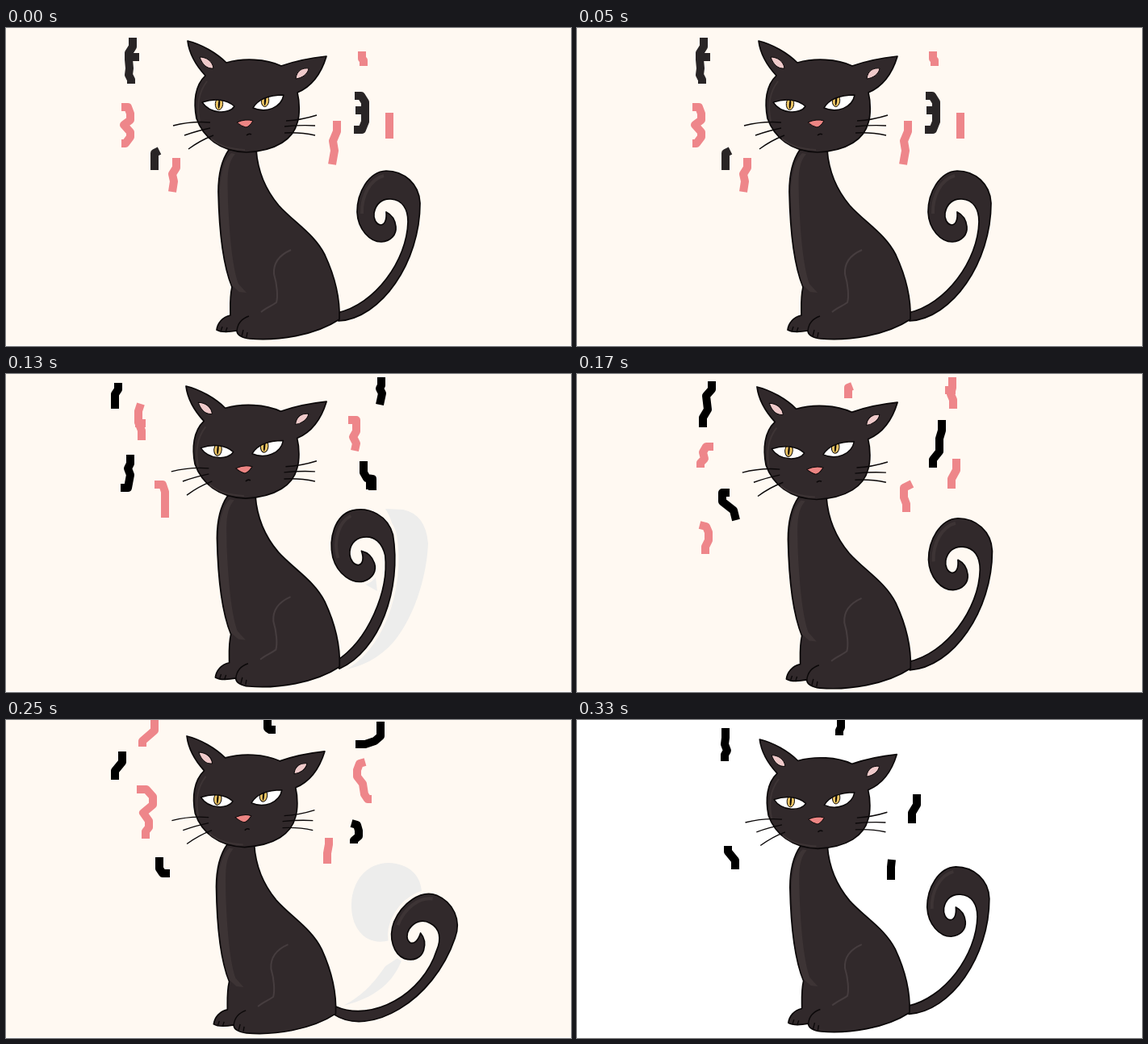
These frames come from a looping animation (700x394 px, 0.41 s). An HTML page with a canvas:

```html
<!DOCTYPE html>
<html lang="en">
<head>
<meta charset="utf-8">
<title>Cat swinging its tail</title>
<style>
html, body { margin: 0; overflow: hidden; background: #fff; }
canvas { display: block; }
</style>
</head>
<body>
<canvas width="700" height="394"></canvas>
<script>
const ctx = document.querySelector('canvas').getContext('2d');
const FUR = '#31292b', SHINE = '#3d3435', LINE = '#0b0809', PINK = '#ee868a', CREAM = '#fff9f2';
const ROOT = { x: 414, y: 360 };

const shape = d => new Path2D(d);
const TAIL_SHINE = shape('M441 230C440 207 452 187 468 183');
const BODY = shape(`M276 151C267 164 263 182 263 203C264 250 268 292 280 321C277 334 278 346 278 356
  C268 358 262 366 261 374C266 377 275 377 286 375C286 380 292 384 302 385C336 388 383 381 413 361
  C414 335 408 309 395 281C382 255 357 241 338 220C322 201 312 179 310 151Z`);
const CHEST = shape(`M284 156C272 170 275 190 275 215C277 260 281 298 288 317L298 328L289 327
  L280 319C268 285 265 240 265 200C266 177 271 162 279 155Z`);
const HAUNCH = shape('M353 275C337 282 331 292 332 305C336 318 337 333 335 340C328 345 322 347 316 352');
const PAWS = shape('M286 375C287 366 292 360 301 357M292 382L294 374M298 383L299 377M266 376L268 370M272 377L274 371');
const HEAD = shape(`M247 59C235 46 227 32 225 16C242 20 261 31 273 43C294 37 322 38 341 47
  C358 41 378 37 397 35C391 55 380 72 361 80C364 92 364 108 361 117C356 137 336 152 298 154
  C265 153 244 135 236 112C232 92 234 71 247 59Z`);
const HEAD_SHINE = shape('M240 116C236 97 239 79 249 66M254 137C267 148 280 150 296 151');
const EARS = shape(`M240 36C248 36 256 41 257 50C249 51 243 45 240 36Z
  M359 63C360 53 367 49 375 50C374 57 367 62 359 63Z`);
const EYES = [
  { lid: shape('M243 92C258 87 273 88 283 97C277 107 253 107 243 92Z'), x: 264, y: 94 },
  { lid: shape('M306 99C313 87 326 83 344 83C341 99 322 106 306 99Z'), x: 321, y: 90 }
];
const NOSE = shape('M286 117Q297 112 306 115Q301 123 297 123Q292 122 286 117Z');
const MOUTH = shape('M298 133Q301 130 304 132');
const WHISKERS = shape(`M253 117Q230 115 207 121M253 124Q238 127 221 133M257 133Q241 139 226 150
  M347 115Q366 114 385 108M345 122Q365 120 383 121M345 130Q365 129 383 133`);

const SWEEP_GHOST = shape(`M470 167L492 168Q520 174 523 210C521 255 504 303 481 331
  C463 352 440 364 414 367C455 340 478 295 480 245C484 210 482 185 470 167ZM442 259L458 252L460 269Z`);
const CURL_GHOST = shape(`M428 228C429 198 448 177 474 177C500 178 514 193 515 213
  C490 220 475 240 475 273C448 281 427 260 428 228Z
  M470 305L493 290C484 318 466 342 418 354C444 340 456 325 470 305Z`);

// m: cat transform, swing: tail angle in degrees, dark/pink: ribbon scraps
const POSES = [
  { end: 80, m: [1, 0, 0, 1, 0, 0], swing: 0, ink: '#292526',
    dark: `M157 12V23L152 31V39L153 50L152 58L155 64V69M149 36H165M432 84H440L445 92V116L441 126H431
      M433 102H446M190 152L184 155V176`,
    pink: `M143 98H151L154 106V114L146 120L154 129V135L148 143H143M211 161V173L206 181L208 190L206 203
      M410 115V128L405 140L407 152L404 169M441 29V38L443 40V47M475 105V137` },
  { end: 170, m: [1.012, 0, 0, 1.008, -4.7, -1.1], swing: -13, ghost: SWEEP_GHOST,
    dark: `M139 11V19L135 25V43M154 100V111L151 117L154 125L151 141H142M465 4V14L463 18L466 24L463 38
      M443 108V122L447 129L454 130V144M446 138H459`,
    pink: `M167 37L164 46V60L168 70V82M160 61H173M184 137H194L197 146V178
      M424 57H434V71L430 78L434 86L432 95` },
  { end: 250, m: [1.012, 0, 0, 1.011, -4.7, -.2], swing: 0,
    dark: `M167 9V19L160 27L162 44L156 54V66M189 147H180V158L194 169L197 181
      M452 57V70L449 80V96L441 106V116`,
    pink: `M169 90H160L156 97L158 105L153 110V116M152 187L160 189L163 196V206L159 214V223
      M341 15L336 17V30M465 4V17L463 25L466 32V43M456 20H469M470 105V119L464 130V142
      M415 136L405 141V153L408 161V171` },
  { end: 330, m: [.994, 0, -.007, .997, .5, 4], swing: 23, ghost: CURL_GHOST,
    dark: `M324 0V10L327 12H334M464 2V20L457 26L445 30H433M144 39V52L135 63V74M190 170V184L194 190H203
      M428 128L435 130L437 137V144L431 149V153`,
    pink: `M184 0V13L169 26V33M162 86H174L182 95V105L170 115L177 125V133L173 138V147
      M445 52L438 54L435 62V70L442 79L444 92L448 98H453M400 146V154L398 165V178` },
  { end: 410, m: [.988, 0, 0, .981, 4, 8.3], swing: 0, bg: '#fff',
    dark: `M184 10V22L183 30L186 38L183 43V51M327 0V9L325 13V19M421 92V105L415 115V128
      M187 156V163L196 174V185M390 173L389 182V198`,
    pink: '' }
];

function stroke(path, color, width) {
  ctx.strokeStyle = color;
  ctx.lineWidth = width;
  ctx.stroke(path);
}

function fill(path, color, width = 1.7) {
  ctx.fillStyle = color;
  ctx.fill(path);
  if (width) stroke(path, LINE, width);
}

function drawEye({ lid, x, y }) {
  fill(lid, '#fff', 0);
  ctx.save();
  ctx.clip(lid);
  const oval = (rx, ry) => {
    const p = new Path2D();
    p.ellipse(x, y, rx, ry, .08, 0, 7);
    return p;
  };
  fill(oval(4.7, 7.5), '#ebc362', 1);
  fill(oval(1.1, 6), LINE, 0);
  ctx.restore();
  stroke(lid, LINE, 1.5);
}

// The stem bends further than the curl, most of all near the root.
function tailShape(angle) {
  const bend = (x, y, amount) => {
    const c = Math.cos(angle * amount), s = Math.sin(angle * amount);
    const dx = x - ROOT.x, dy = y - ROOT.y;
    return `${ROOT.x + dx * c - dy * s} ${ROOT.y + dx * s + dy * c} `;
  };
  return shape(`M412 363C${bend(465, 360, .6)}${bend(513, 290, .25)}513 217C512 193 493 177 471 177
    C449 178 435 204 435 228C436 250 451 265 465 265C477 264 484 256 483 246C482 237 477 231 471 228
    C472 238 469 244 464 244C458 243 455 236 456 229C458 218 466 211 477 212C491 213 498 224 498 240
    C${bend(497, 288, .25)}${bend(457, 343, .6)}410 353Z`);
}

function drawTail(swing, bg, halo) {
  const angle = swing * Math.PI / 180;
  const tail = tailShape(angle);
  ctx.save();
  ctx.translate(ROOT.x, ROOT.y);
  ctx.rotate(angle);
  ctx.translate(-ROOT.x, -ROOT.y);
  if (halo) stroke(tail, bg, 9);
  fill(tail, FUR);
  stroke(TAIL_SHINE, SHINE, 4);
  ctx.restore();
}

function drawCat() {
  fill(BODY, FUR);
  fill(CHEST, SHINE, 0);
  stroke(HAUNCH, '#463d3f', 2);
  stroke(PAWS, LINE, 1.4);
  fill(HEAD, FUR);
  stroke(HEAD_SHINE, SHINE, 2);
  fill(EARS, '#efcaca', 1);
  EYES.forEach(drawEye);
  fill(NOSE, '#ec8583', 1);
  stroke(MOUTH, LINE, 1.5);
  stroke(WHISKERS, LINE, 1.4);
}

function draw(now) {
  const t = now % 410;
  const { m, swing, ghost, dark, pink, ink = '#000', bg = CREAM } = POSES.find(p => t < p.end);
  ctx.setTransform(1, 0, 0, 1, 0, 0);
  ctx.lineJoin = 'round';
  ctx.fillStyle = '#fff';
  ctx.fillRect(0, 0, 700, 394);
  ctx.fillStyle = bg;
  ctx.fillRect(0, 0, 700, 393);
  if (ghost) fill(ghost, '#ededec', 0);
  stroke(shape(dark), ink, 10);
  stroke(shape(pink), PINK, 10);
  ctx.setTransform(...m);
  drawTail(swing, bg, ghost);
  drawCat();
  requestAnimationFrame(draw);
}
requestAnimationFrame(draw);
</script>
</body>
</html>
```
